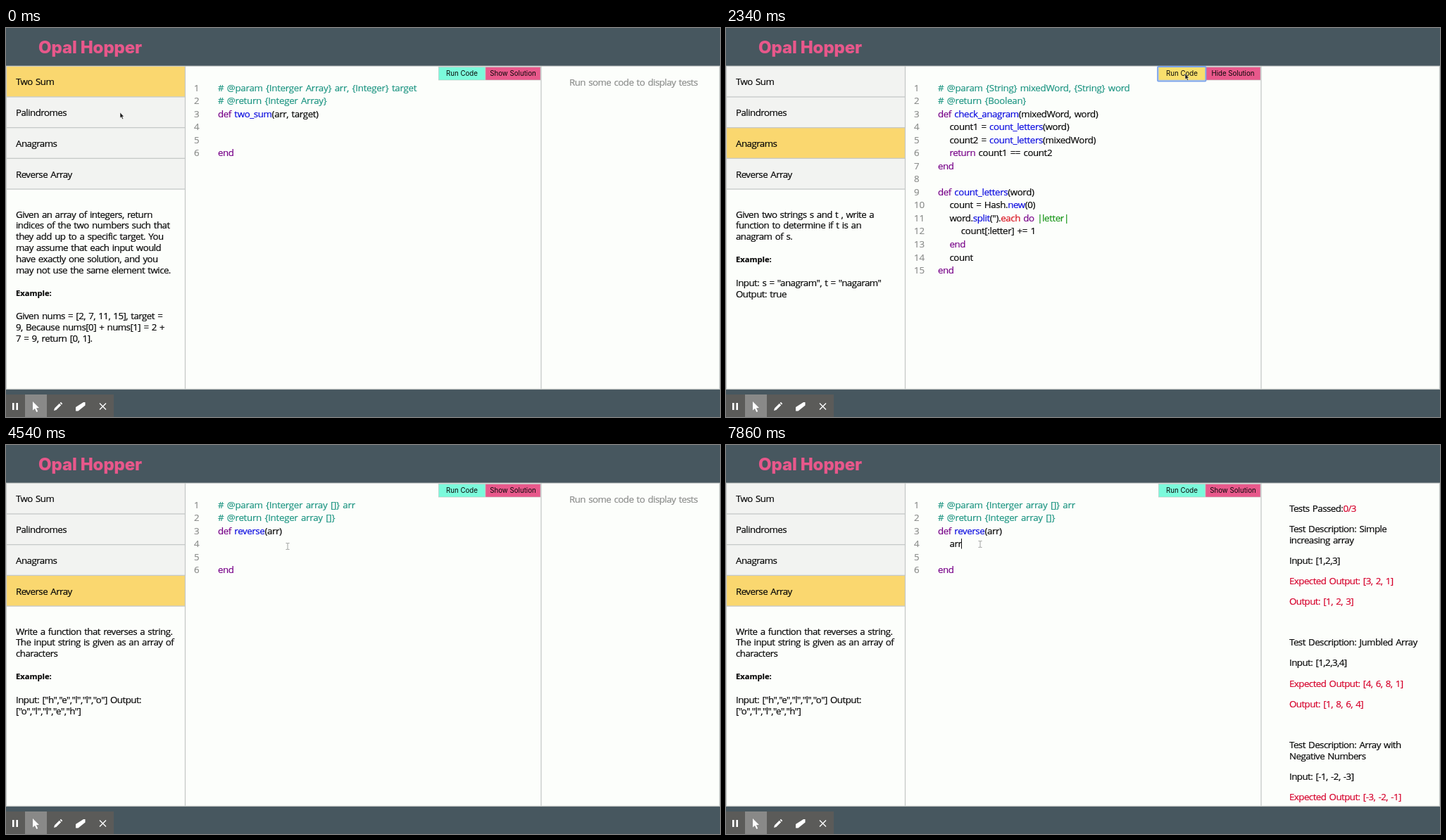
Animation, 1014 px wide and 553 px high, one loop 8 s. Source, as an HTML page:

```html
<!DOCTYPE html>
<html lang="en">
<head>
<meta charset="utf-8">
<title>Code exercises</title>
<style>
html, body { margin: 0; width: 100%; height: 100%; overflow: hidden; background: #47575f; }
svg { display: block; width: 1014px; height: 553px; }
text { font: 13.3px "Open Sans", "Noto Sans", sans-serif; letter-spacing: -.53px; word-spacing: 1.3px; color: #080808; }
text, tspan { fill: currentColor; stroke: currentColor; stroke-width: .2px; }
.code { letter-spacing: -.38px; }
.note { letter-spacing: -.27px; color: #1f9683; }
.num { letter-spacing: 0; color: #8c8e8c; }
.key { color: #770088; }
.fn { color: #0b0be0; }
.each { color: #d8101c; }
.arg, .good { color: #159415; }
.bad { color: #d6002b; }
.hint { color: #8b8d8b; }
.bold { font-size: 11.2px; font-weight: 700; letter-spacing: 0; }
.button { font: 9.7px Inter, sans-serif; letter-spacing: 0; word-spacing: 0; text-anchor: middle; stroke: none; }
.title { font: 800 24px Inter, sans-serif; letter-spacing: -.1px; word-spacing: 0; color: #e8588b; }
</style>
</head>
<body>
<svg viewBox="0 0 1014 553">
  <rect width="1014" height="460" y="54" fill="#fcfefb"/>
  <g id="page"></g>
  <path d="M0 54H1014M0 513.5H1014M.5 54V513M254.5 54V513M760 54V513M1013.5 54V513" stroke="#c6c9c8" stroke-width="1.3"/>
  <path d="M0 0H1014V53.4H0zM0 514.2H1014V553H0z" fill="#47575f"/>
  <text class="title" x="46" y="36">Opal Hopper</text>
  <g id="buttons"></g>
  <rect y="521" width="153" height="32" fill="#5b5b59"/>
  <rect x="27" y="521" width="31" height="32" fill="#898988"/>
  <g fill="#fff">
    <path d="M9 533h2.6v10H9zM14.4 533H17v10h-2.6z"/>
    <path d="M38 531V543.5L41 541L43.3 546L45.2 545L43 540.3L47 540z"/>
    <path d="M68 544L69 540.6L75.8 533.8L78.2 536.2L71.4 543zM76.6 533L78 531.8L80.2 534L79 535.4z"/>
    <path d="M99 539L110 532H112.5V536.5L102.5 544.5H99z"/>
  </g>
  <path d="M133 533.5L142 542.5M142 533.5L133 542.5" stroke="#fff" stroke-width="1.4"/>
  <g id="pointer"></g>
</svg>
<script>
const LOOP = 8000;
const tasks = [
  { name: 'Two Sum',
    about: ['Given an array of integers, return', 'indices of the two numbers such that', 'they add up to a specific target. You', 'may assume that each input would', 'have exactly one solution, and you', 'may not use the same element twice.'],
    example: ['Given nums = [2, 7, 11, 15], target =', '9, Because nums[0] + nums[1] = 2 +', '7 = 9, return [0, 1].'],
    code: ['# @param {Interger Array} arr, {Integer} target', '# @return {Integer Array}', 'def two_sum(arr, target)', '', '', 'end'] },
  { name: 'Palindromes' },
  { name: 'Anagrams',
    about: ['Given two strings s and t , write a', 'function to determine if t is an', 'anagram of s.'],
    example: ['Input: s = "anagram", t = "nagaram"', 'Output: true'],
    code: ['# @param {String} mixedWord, {String} word', '# @return {Boolean}', 'def check_anagram(mixedWord, word)', '', '', 'end'],
    solution: ['  count1 = count_letters(word)', '  count2 = count_letters(mixedWord)', '  return count1 == count2', 'end', '',
      'def count_letters(word)', '  count = Hash.new(0)', "  word.split('').each do |letter|", '    count[:letter] += 1', '  end', '  count', 'end'],
    score: '3/3', mark: 'good',
    tests: [[['All lowercase'], '("eroh", "hero")', 'true', 'true'], [['Mix of Cases'], '("HleOl", "HellO")', 'true', 'true'], [['Not an', 'Anagram'], '("not", "aword")', 'false', 'false']] },
  { name: 'Reverse Array',
    about: ['Write a function that reverses a string.', 'The input string is given as an array of', 'characters'],
    example: ['Input: ["h","e","l","l","o"] Output:', '["o","l","l","e","h"]'],
    code: ['# @param {Interger array []} arr', '# @return {Integer array []}', 'def reverse(arr)', '', '', 'end'],
    score: '0/3', mark: 'bad',
    tests: [[['Simple', 'increasing array'], '[1,2,3]', '[3, 2, 1]', '[1, 2, 3]'], [['Jumbled Array'], '[1,2,3,4]', '[4, 6, 8, 1]', '[1, 8, 6, 4]'], [['Array with', 'Negative Numbers'], '[-1, -2, -3]', '[-3, -2, -1]', '[-1, -2, -3]']] }
];

const ticks = [0, 100, 540, 740, 1030, 1170, 1770, 1940, 2210, 2340, 3160, 3300, 3450, 4390, 4540, 4700, 4970, 5250, 5580, 6200, 6340, 6600, 6730, 7730, 7860, LOOP];
const path = [[0, 162, 120], [100, 162, 120], [390, 143, 170], [740, 143, 170], [1160, 719, 66], [1460, 719, 66], [1765, 652, 65], [2470, 652, 65],
  [3160, 174, 224], [3300, 174, 224], [3580, 160, 208], [3850, 160, 208], [4390, 400, 144], [5580, 400, 144], [6200, 587, 60], [6340, 587, 60],
  [6400, 647, 65], [6860, 647, 65], [7450, 361, 141], [LOOP, 361, 141]];
const clicks = [390, 1170, 1940, 3580, 4700, 6400, 7450];

const between = (t, a, b) => t >= a && t < b;
const text = (x, y, s, cls = '') => `<text x="${x}" y="${y.toFixed(1)}" class="${cls}">${s}</text>`;

function snap(t) {
  const i = ticks.findLastIndex(v => v <= t), gap = ticks[i + 1] - ticks[i];
  const step = gap / Math.max(1, Math.round(gap / 140));
  return ticks[i] + Math.floor((t - ticks[i]) / step) * step;
}

function pointerAt(t) {
  const i = Math.min(path.findLastIndex(p => p[0] <= t), path.length - 2);
  const [t0, x0, y0] = path[i], [t1, x1, y1] = path[i + 1];
  const u = (t - t0) / (t1 - t0), k = u * u * (3 - 2 * u);
  return [x0 + (x1 - x0) * k, y0 + (y1 - y0) * k];
}

function paint(line) {
  return line.replace(/\b(def|end|return|do)\b|\w+(?=\()|\beach\b|\|\w+\|/g, (m, key) => {
    const cls = key ? 'key' : m === 'each' ? 'each' : m[0] === '|' ? 'arg' : 'fn';
    return `<tspan class="${cls}">${m}</tspan>`;
  });
}

function sidebar(sel) {
  const top = i => 54.2 + 43.7 * i;
  let out = tasks.map((task, i) =>
    `<rect y="${top(i)}" width="254" height="43.7" fill="${i === sel ? '#fad76f' : '#f2f3f1'}"/>` + text(14, top(i) + 27.2, task.name)).join('');
  out += tasks.map((_, i) => `<rect y="${top(i + 1) - .6}" width="254" height="1.3" fill="#c6c9c8"/>`).join('');
  let y = 269.5;
  const lines = list => list.forEach(s => { out += text(14, y, s); y += 15.9; });
  lines(tasks[sel].about);
  out += text(14, y + 15.6, 'Example:', 'bold');
  y += 49.4;
  lines(tasks[sel].example);
  return out;
}

function editor(task, solved, typed) {
  const code = solved ? [...task.code.slice(0, 3), ...task.solution] : [...task.code];
  if (typed) code[3] = '  ' + typed;
  return code.map((line, i) => {
    const y = 89.5 + 18.54 * i, body = line.trimStart();
    const x = 301 + (line.length - body.length) / 2 * 16.4;
    return text(267, y, i + 1, 'num') + (body[0] === '#' ? text(x, y, body, 'code note') : text(x, y, paint(body), 'code'));
  }).join('');
}

function results({ tests, score, mark }) {
  let y = 94.8, out = text(800, y, `Tests Passed:<tspan class="${mark}">${score}</tspan>`);
  const row = (s, cls) => { out += text(800, y += 29.1, s, cls); };
  for (const [about, input, want, got] of tests) {
    row('Test Description: ' + about[0]);
    if (about[1]) out += text(800, y += 15.9, about[1]);
    row('Input: ' + input);
    row('Expected Output: ' + want, mark);
    row('Output: ' + got, mark);
    y += 29.1;
  }
  return out;
}

function button(x, w, label, fill, focused, [px, py]) {
  const hover = between(px, x, x + w) && between(py, 56, 75);
  return `<rect x="${x}" y="55.5" width="${w}" height="18.5" fill="${hover ? '#f8df6c' : fill}" stroke="#b9bfbc" stroke-width=".6"/>`
    + (focused ? `<rect x="${x - 1.5}" y="55" width="${w + 2.5}" height="20.5" rx="1" fill="none" stroke="#7ba4ea" stroke-width="1.8"/>` : '')
    + text(x + w / 2, 68.2, label, 'button');
}

function pointer(t, [x, y]) {
  let out = '';
  const age = t - clicks.findLast(c => c <= t);
  if (age < 400) {
    out += `<circle cx="${x + 1}" cy="${y + 1}" r="${Math.min(21, 8 + age * .09)}" fill="none" stroke="#f05b4c" stroke-width="2.2" opacity="${Math.min(1, 2 - age / 200)}"/>`;
  }
  if (between(t, 4970, 5580)) return out;
  const beam = between(x, 258, 756) && y > 76;
  return out + `<g transform="translate(${x} ${y})">` + (beam
    ? '<path d="M-2.5 -4.5H-.8L0 -4L.8 -4.5H2.5M0 -4V4M-2.5 4.5H-.8L0 4L.8 4.5H2.5" fill="none" stroke="#979997" stroke-width=".9"/>'
    : '<path d="M0 0V8L1.8 6.5L3.2 9.5L4.6 8.9L3.2 6H5.5z" fill="#1c1c1c" stroke="#fff" stroke-width=".5"/>') + '</g>';
}

const shown = {};
function put(id, html) {
  if (shown[id] !== html) document.getElementById(id).innerHTML = shown[id] = html;
}

function draw(now) {
  const t = snap(now % LOOP), pos = pointerAt(t);
  const sel = t < 540 ? 0 : t < 3750 ? 2 : 3, task = tasks[sel];
  const solved = between(t, 1310, 3750);
  const typed = 'arr'.slice(0, [4970, 5250, 5580].filter(v => t >= v).length);
  const tested = between(t, 2470, 3750) || t >= 6860;
  const waiting = between(t, 2210, 2470) || between(t, 6600, 6860);
  const caret = between(t, 4830, 6460) || t >= 7450;
  put('page', sidebar(sel) + editor(task, solved, typed)
    + (caret ? `<rect x="${317 + [0, 7, 12, 17][typed.length]}" y="133" width="1" height="14.5" fill="#111"/>` : '')
    + (tested ? results(task) : waiting ? '' : text(800, 81.5, 'Run some code to display tests', 'hint')));
  put('buttons', button(681, 78, solved ? 'Hide Solution' : 'Show Solution', '#e8588b', between(t, 1310, 2070), pos)
    + button(614.5, 66, 'Run Code', '#7bfadb', between(t, 2070, 3750) || between(t, 6460, 7450), pos));
  put('pointer', pointer(t, pos));
  requestAnimationFrame(draw);
}
requestAnimationFrame(draw);
</script>
</body>
</html>
```
